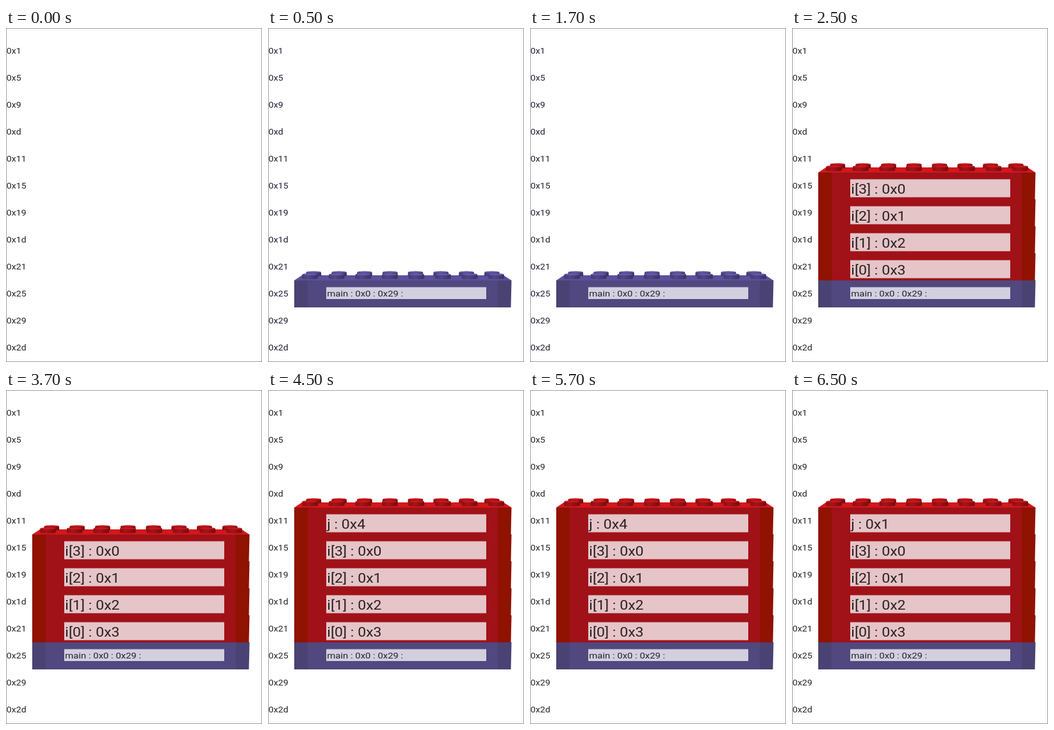
Animation of 400x520 px, one loop 8000 ms. Source, as an HTML page:

```html
<!DOCTYPE html>
<html lang="en">
<head>
<meta charset="utf-8">
<title>Memory stack</title>
<style>
html, body { margin: 0; width: 100%; height: 100%; overflow: hidden; background: #fff; }
svg { display: block; width: 400px; height: 520px; font-family: Roboto, sans-serif; }
.frame { fill: #fff; stroke: #a0a0a0; }
.address { font-size: 14.2px; fill: #242424; animation: tint 8s step-end infinite; }
.small { font-size: 14.9px; fill: #232330; }
.large { font-size: 23.1px; fill: #2a2023; }
.main, .array, .var, .new { visibility: hidden; animation: 8s step-end infinite; }
.main { animation-name: main; }
.array { animation-name: array; }
.var { animation-name: var; }
.old { animation: old 8s step-end infinite; }
.new { animation-name: new; }
@keyframes main { 0% { visibility: hidden } 6.25%, 100% { visibility: visible } }
@keyframes array { 0% { visibility: hidden } 31.25%, 100% { visibility: visible } }
@keyframes var { 0% { visibility: hidden } 56.25%, 100% { visibility: visible } }
@keyframes old { 0% { visibility: hidden } 56.25% { visibility: visible } 81.25%, 100% { visibility: hidden } }
@keyframes new { 0% { visibility: hidden } 81.25%, 100% { visibility: visible } }
@keyframes tint { 0% { fill: #242424 } 6.25% { fill: #201e34 } 31.25%, 100% { fill: #242424 } }
</style>
</head>
<body>
<svg id="stage" viewBox="0 0 400 520">
  <defs>
    <linearGradient id="purpleSide"><stop offset="0" stop-color="#443b72"/><stop offset=".4" stop-color="#50478a"/><stop offset="1" stop-color="#3a3262"/></linearGradient>
    <linearGradient id="redSide"><stop offset="0" stop-color="#8c0e12"/><stop offset=".4" stop-color="#a81318"/><stop offset="1" stop-color="#740b0e"/></linearGradient>
  </defs>
  <rect class="frame" x=".5" y=".5" width="399" height="519"/>
</svg>
<script>
const STEP = 42;
const SQUASH = .87; // the view is flattened vertically
const purple = { front: '#50487f', edge: '#4b4274', top: '#5c519c', cap: '#655aa6', side: 'url(#purpleSide)', tag: '#d2d0de' };
const red = { front: '#a01218', edge: '#901200', top: '#d4171c', cap: '#c4181d', side: 'url(#redSide)', tag: '#e5c5c8' };

const shape = (d, fill) => `<path d="${d}" fill="${fill}"/>`;
const text = (x, y, kind, value) =>
  `<text class="${kind}" transform="translate(${x} ${y}) scale(1 ${SQUASH})">${value}</text>`;

function stud(x, y, r, h, c) {
  const wide = r + .5;
  return shape(`M${x - r} ${y}L${x - wide} ${y + h}A${wide} 1.7 0 0 0 ${x + wide} ${y + h}L${x + r} ${y}Z`, c.side) +
    `<ellipse cx="${x}" cy="${y}" rx="${r}" ry="1.5" fill="${c.cap}"/>`;
}

function studRow(first, gap, y, r, h, c) {
  let out = '';
  for (let i = 0; i < 8; i++) out += stud(first + gap * i, y, r, h, c);
  return out;
}

function brick(y, c, tagHeight, label) {
  const b = y + STEP;
  const tag = y + 10.5;
  return shape(`M41 ${y}L53 ${y - 8}H368L380.5 ${y}Z`, c.top) +
    studRow(71.3, 39.8, y - 13, 11.6, 5.4, c) +
    studRow(65.5, 41.6, y - 9.4, 12, 6, c) +
    shape(`M41 ${y}H380.5L379.5 ${b}H41Z`, c.edge) +
    shape(`M62 ${y}H359V${b}H62Z`, c.front) +
    shape(`M91 ${tag}H341V${tag + tagHeight}H91Z`, c.tag) + label;
}

const group = (name, content) => `<g class="${name}">${content}</g>`;
const redBrick = (y, label) => brick(y, red, 28, label);
const large = (y, value, kind = '') => text(92.3, y + 33, 'large ' + kind, value);

let scene = '';
for (let i = 0; i < 12; i++)
  scene += text(.8, 40.2 + STEP * i, 'address', '0x' + (1 + 4 * i).toString(16));

scene += group('main', brick(393, purple, 18.5, text(92.3, 418.2, 'small', 'main : 0x0 : 0x29 :')));

let cells = '';
for (let i = 0; i < 4; i++) {
  const y = 351 - STEP * i;
  cells += redBrick(y, large(y, `i[${i}] : 0x${3 - i}`));
}
scene += group('array', cells);

scene += group('var', redBrick(183, large(183, 'j : 0x4', 'old') + large(183, 'j : 0x1', 'new')));

document.getElementById('stage').insertAdjacentHTML('beforeend', scene);
</script>
</body>
</html>
```
